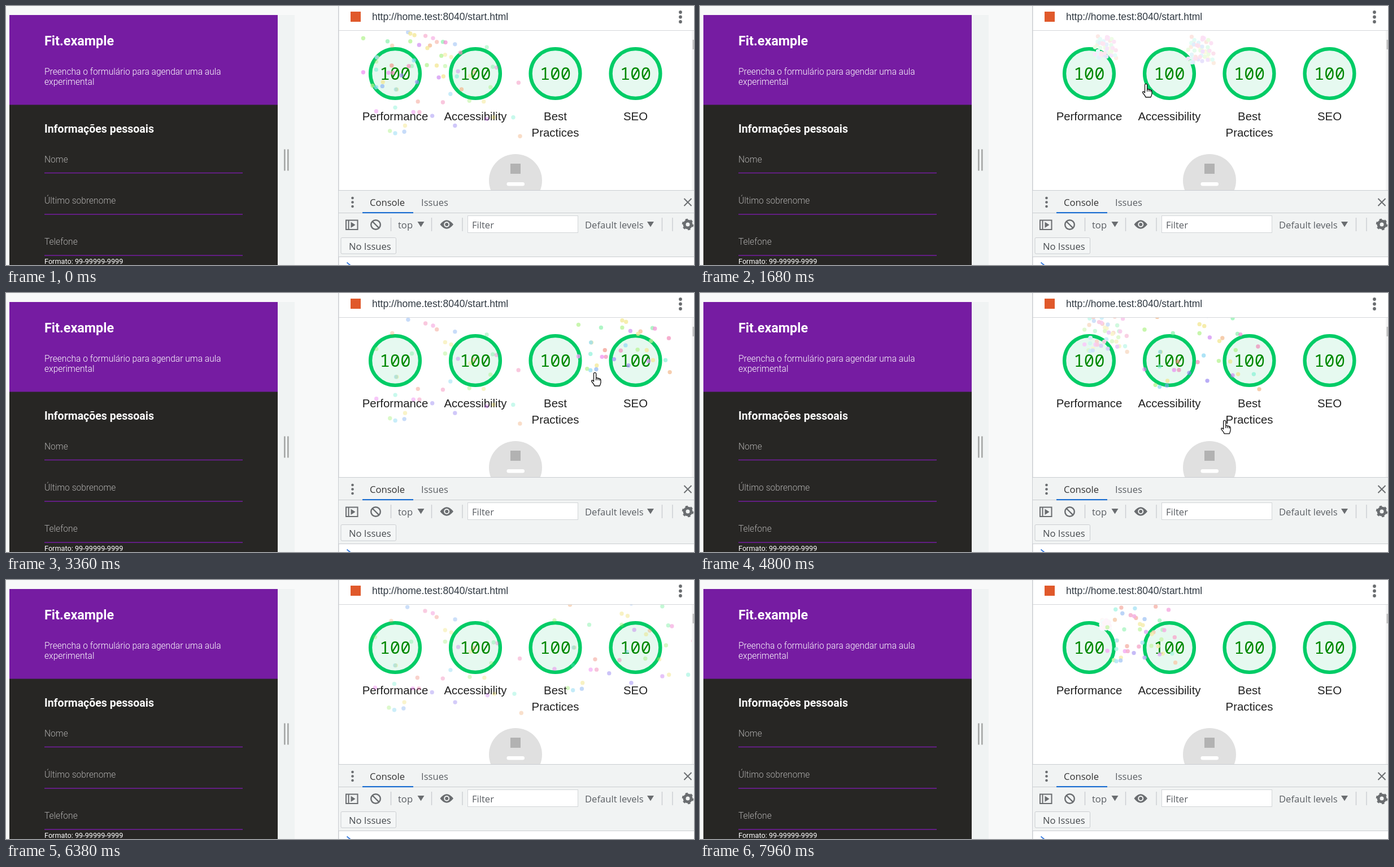
An HTML page with a canvas for the animation above (8 s loop, 1218 by 460 pixels).

```html
<!DOCTYPE html>
<html lang="pt-BR">
<head>
<meta charset="utf-8">
<title>Audit</title>
<style>
  html, body { margin: 0; width: 100%; height: 100%; overflow: hidden; background: #f8f9f9; }
  svg, canvas { position: absolute; left: 0; top: 0; }
  .form { font: 300 15.6px Roboto, sans-serif; fill: #fff; }
  .form .label { fill: #b0afae; }
  .form .bold { font-weight: 700; }
  .ui { font: 16.6px "Open Sans", sans-serif; fill: #5a5e63; }
  .report { font: 20.4px "Liberation Sans", Arial, sans-serif; fill: #212121; text-anchor: middle; }
  .score { font: 30.5px "Noto Sans Mono", monospace; fill: #080; }
  .icon { fill: none; stroke: #6a6d70; stroke-width: 2; }
  .solid { fill: #6a6d70; }
</style>
</head>
<body>
<svg width="1218" height="460" viewBox="0 0 1218 460">
  <!-- form page -->
  <rect x="481" y="16" width="30" height="444" fill="#f0f3f3"/>
  <rect x="6" y="16" width="475" height="160" fill="#761ca2"/>
  <rect x="6" y="175.500" width="475" height="285" fill="#272624"/>
  <path d="M493.300 254.500V292.500M499.300 254.500V292.500" stroke="#a5a7a6" stroke-width="2.600"/>
  <path d="M68 296.500H419M68 370H419M68 443H419" stroke="#761ca2" stroke-width="1.300"/>
  <g class="form">
    <text class="bold" x="68" y="70" font-size="23.4" style="font-size:23.4px">Fit.example</text>
    <text x="68" y="122">Preencha o formulário para agendar uma aula</text>
    <text x="68" y="140">experimental</text>
    <text class="bold" x="68" y="225" style="font-size:19.5px">Informações pessoais</text>
    <text class="label" x="68" y="278">Nome</text>
    <text class="label" x="68" y="351">Último sobrenome</text>
    <text class="label" x="68" y="424">Telefone</text>
    <text x="68" y="458" style="font-size:12.7px;font-weight:400">Formato: 99-99999-9999</text>
  </g>

  <!-- report panel -->
  <rect x="589" width="629" height="460" fill="#fff"/>
  <rect x="588" width="1.500" height="460" fill="#cacdd1"/>
  <rect x="589" y="43" width="629" height="1" fill="#d5d7d9"/>
  <rect x="610" y="10" width="18" height="18" fill="#e0592b"/>
  <text x="648" y="25" style="font:17.5px 'Liberation Sans',Arial,sans-serif" fill="#303942">http://home.test:8040/start.html</text>
  <g class="solid"><circle cx="1194" cy="11" r="2.900"/><circle cx="1194" cy="19.500" r="2.900"/><circle cx="1194" cy="28" r="2.900"/></g>
  <rect x="1214" y="44" width="4" height="283" fill="#f5f5f5"/>
  <rect x="1215.500" y="60" width="3" height="17" fill="#c1c1c1"/>
  <g id="gauges" class="report"></g>
  <circle cx="902" cy="310" r="47" fill="#e0e0e0"/>
  <rect x="893" y="280" width="18" height="18" fill="#b2b2b2"/>
  <rect x="886.500" y="313" width="31.500" height="6.500" rx="3.200" fill="#fff"/>

  <!-- console drawer -->
  <rect x="589" y="327" width="629" height="119" fill="#f1f3f3"/>
  <path d="M589 327.500H1218M589 367.500H1218M589 445.500H1218" stroke="#cacdd1"/>
  <rect x="631" y="366" width="90" height="2.200" fill="#1a6dd0"/>
  <g class="solid"><circle cx="613.500" cy="341" r="2.300"/><circle cx="613.500" cy="348.500" r="2.300"/><circle cx="613.500" cy="356" r="2.300"/></g>
  <rect x="817.500" y="372.500" width="195" height="30" fill="#fff" stroke="#d2d5d8"/>
  <rect x="593" y="411.500" width="97.500" height="28.500" rx="2" fill="#f4f6f6" stroke="#cacdd1"/>
  <g class="ui">
    <text x="644" y="355" fill="#333" style="fill:#333">Console</text>
    <text x="735" y="355">Issues</text>
    <text x="694" y="394.500">top</text>
    <text x="825" y="394.500">Filter</text>
    <text x="1025" y="394.500">Default levels</text>
    <text x="607" y="433" style="fill:#45494d">No Issues</text>
  </g>
  <path d="M681.500 376V400M753.500 376V400M808 376V400M1161.500 376V400M1180 376V400" stroke="#cacdd1" stroke-width="1.400"/>
  <g class="icon">
    <path d="M1200.500 342L1213.500 355M1213.500 342L1200.500 355"/>
    <path d="M602 380.500H622.500V397H602ZM606.500 380V397"/>
    <circle cx="654.500" cy="388.500" r="8.300" stroke-width="2.400"/>
    <path d="M648.500 382.500L660.500 394.500" stroke-width="2.400"/>
    <circle cx="1207" cy="388" r="6" stroke-width="5"/>
    <circle cx="1207" cy="388" r="8.800" stroke-width="3" stroke-dasharray="4.400 4.815"/>
  </g>
  <path class="solid" d="M610.500 383.500L618.500 388.700L610.500 394ZM728.500 383H740.500L734.500 392.500ZM1135 383H1147L1141 392.500ZM768.500 388Q780 372.500 792 388Q780 403.500 768.500 388Z"/>
  <circle cx="780.200" cy="388" r="4" fill="#6a6d70" stroke="#f1f3f3" stroke-width="2"/>
  <path d="M603.500 455.500L609.500 460.500L603.500 465.500" fill="none" stroke="#3d7fe0" stroke-width="2"/>
</svg>
<canvas id="stage" width="1218" height="460"></canvas>
<script>
const LOOP = 8000, SCALE = 1.469;

const gauges = [[689, 'Performance'], [831, 'Accessibility'], [972.5, 'Best', 'Practices'], [1114.5, 'SEO']];
document.getElementById('gauges').innerHTML = gauges.map(([x, ...lines]) =>
  `<circle cx="${x}" cy="120" r="43.9" fill="#e6f9f0" stroke="#0c6" stroke-width="6.3"/>
   <text class="score" x="${x}" y="131">100</text>` +
  lines.map((s, i) => `<text x="${x}" y="${203 + 29 * i}">${s}</text>`).join('')).join('');

// Spark offsets (x, y pairs) keyed by hue
const sparks = {
  165: [-70, -116, -47, -139, -68, -5, 88, 8],
  140: [53, -85, 61, -59, -46, -60],
  98: [58, -32, -93, -66, 30, -14, -2, -60, -75, 26, 57, -139],
  53: [-2, -75, 62, 8, -66, -29, 31, -47, -55, 19, 49, -13, 6, -72],
  26: [-72, -87, 36, -52, 97, 33],
  8: [42, -124, -38, -13, -13, -92, -67, -163, -54, -121],
  333: [-36, 1, -5, -12, 95, -38, -28, -100],
  317: [13, -142, 66, -58, 78, -115, 15, -157, -18, -97],
  298: [24, -152, -93, 0, -44, 1],
  280: [15, -53, 53, 10],
  250: [-19, 6, 11, 19],
  215: [-51, -105, -56, 27, 11, -89],
  195: [-16, -119, -67, -29, 5, -23, -68, 29]
};
// Burst origins, in percent of the panel width: left, top
const slots = [[47, 4], [30, 7], [70, 6], [20, 3], [80, 3]];
const bursts = [{ phase: 1.782, period: 1.25 }, { phase: 3.475, period: 1 }];

// Screen updates: first, last, count
const updates = [[0, 70, 2], [70, 840, 11], [910, 1680, 11], [1740, 2500, 12], [2570, 3360, 12],
  [3440, 4190, 12], [4260, 5000, 12], [5070, 5820, 12], [5890, 6650, 12], [6720, 7470, 12], [7540, 7960, 7]];

// Pointer path: time, x, y
const route = [[1150, 830, 475], [1680, 792, 150], [2570, 822, 132], [3360, 1045, 153],
  [4190, 985, 205], [4800, 931, 238], [5000, 926, 305], [5350, 915, 475]];
const hand = new Path2D('M-4.500 4V-9.500a2.100 2.100 0 0 1 4.200 0V-2.500l6 1.300q2.300 .8 2.300 3V6q-.6 3-2 6H-3q-1-3-5-7.500q-1-2.200 .8-2.600q1 0 2.700 2.100zM-.3-2.500V2M3-1.500V2M6-.8V2.500');

const ctx = document.getElementById('stage').getContext('2d');

// Both curves share the same y polynomial; only the x handles differ
function bezier(x, a, b) {
  let lo = 0, hi = 1, t;
  for (let i = 0; i < 24; i++) {
    t = (lo + hi) / 2;
    const u = 1 - t;
    if (3 * t * u * u * a + 3 * t * t * u * b + t * t * t < x) lo = t; else hi = t;
  }
  return t * t * (3 - 2 * t);
}
const easeOut = x => bezier(x, 0, 0.58);
const easeIn = x => bezier(x, 0.42, 1);

function snap(t) {
  const [first, last, count] = updates.filter(u => u[0] <= t).pop();
  const gap = (last - first) / (count - 1);
  return first + Math.min(count - 1, Math.floor((t - first) / gap + 1e-6)) * gap;
}

function drawBurst({ phase, period }, sec) {
  const fallPhase = phase + sec / period;
  const bangPhase = fallPhase - 0.03 / period; // the spread lags slightly behind the fall
  const spread = easeOut(bangPhase % 1), fall = easeIn(fallPhase % 1);
  const [left, top] = slots[Math.floor(bangPhase) % 5];
  const cx = 592.6 + 6.25 * left, cy = 65 + 6.25 * top + 80 * SCALE * fall;
  ctx.globalAlpha = 1 - fall;
  for (const hue in sparks) {
    const p = sparks[hue];
    ctx.fillStyle = `hsl(${hue}, 80%, ${100 - 40 * spread}%)`;
    for (let i = 0; i < p.length; i += 2) {
      ctx.beginPath();
      ctx.arc(cx + p[i] * SCALE * spread, cy + p[i + 1] * SCALE * spread, 2.5 * SCALE, 0, 7);
      ctx.fill();
    }
  }
}

function drawPointer(t) {
  const i = route.findIndex(r => r[0] > t);
  if (i < 1) return;
  const [t0, x0, y0] = route[i - 1], [t1, x1, y1] = route[i];
  const k = (t - t0) / (t1 - t0);
  ctx.save();
  ctx.translate(x0 + (x1 - x0) * k, y0 + (y1 - y0) * k);
  ctx.fillStyle = '#fff';
  ctx.strokeStyle = '#111';
  ctx.lineWidth = 1.3;
  ctx.lineJoin = 'round';
  ctx.fill(hand);
  ctx.stroke(hand);
  ctx.restore();
}

function draw(now) {
  const t = snap(now % LOOP);
  ctx.clearRect(0, 0, 1218, 460);
  ctx.save();
  ctx.beginPath();
  ctx.rect(589, 44, 625, 283);
  ctx.clip();
  for (const b of bursts) drawBurst(b, t * 0.9855 / 1000);
  ctx.restore();
  drawPointer(t);
}

const start = performance.now();
(function tick() {
  draw(performance.now() - start);
  requestAnimationFrame(tick);
})();
</script>
</body>
</html>
```
